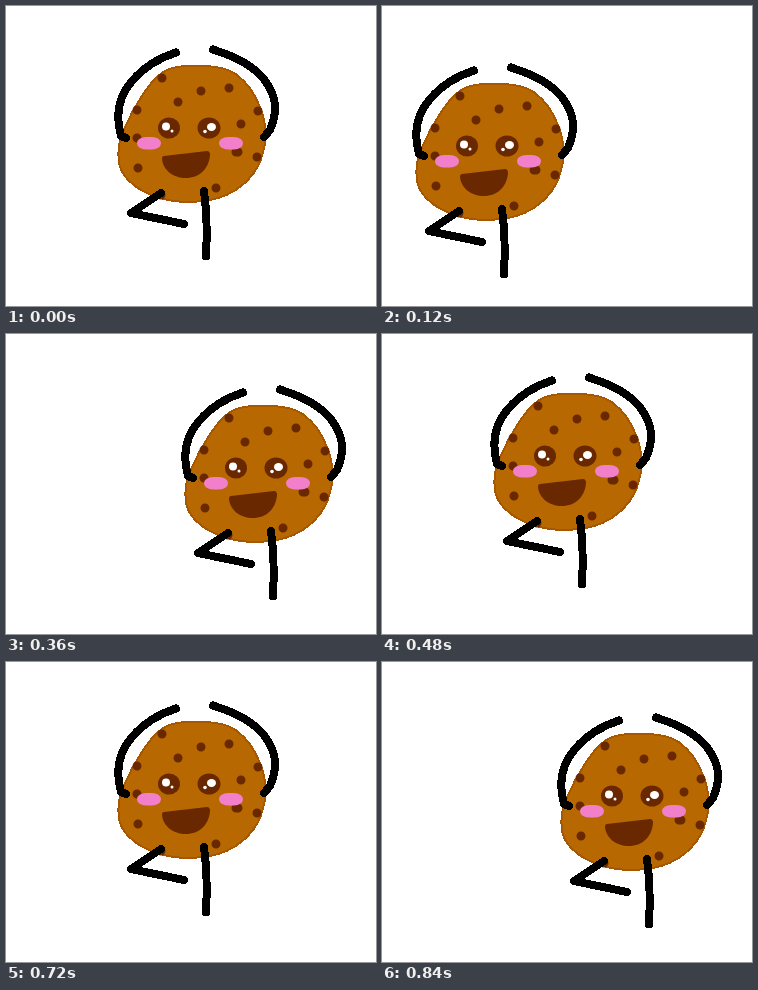
Recreate the animation shown at these times as an HTML page. Size 370 by 300 pixels, loop 0.96 s.

```html
<!DOCTYPE html>
<html lang="en">
<head>
<meta charset="utf-8">
<title>Dancing cookie</title>
<style>
  html, body { margin: 0; width: 100%; height: 100%; overflow: hidden; background: #fff; }
  svg { display: block; width: 370px; height: 300px; }
  .body { fill: #b86800; stroke: #a75700; stroke-width: 2; }
  .chips, .limbs { fill: none; stroke-linecap: round; stroke-linejoin: round; }
  .chips { stroke: #692800; stroke-width: 9; }
  .limbs { stroke: #000; stroke-width: 8; }
  .body, .limbs { shape-rendering: crispEdges; }
  .dark { fill: #692800; }
  .blush { fill: #f17fca; }
  .shine { fill: #fff; }
</style>
</head>
<body>
<svg viewBox="0 0 370 300">
  <g id="cookie">
    <path class="body" d="M156 67C165 60 178 60 190 60S219 60 231 69S249 88 254 101S262 130 257 146C253 166 236 185 212 192C200 196 189 196 178 196C162 195 148 192 135 184C122 176 115 168 113 157C111 143 113 133 119 121C126 105 143 75 156 67Z"/>
    <!-- Each chip is a zero-length stroke with round caps -->
    <path class="chips" d="M156 72h0M195 85h0M223 82h0M172 96h0M131 104h0M252 105h0M235 118h0M131 132h0M230 146h2M251 151h0M132 162h0M210 182h0M155 189h0"/>
    <g class="dark">
      <ellipse cx="163" cy="122" rx="11" ry="10.5"/>
      <ellipse cx="203" cy="122" rx="11.5" ry="10.5"/>
      <path d="M158 150L201 145Q204 145 204 149C203 163 193 172 180 172C167 172 157 164 156 153Q156 150 158 150Z"/>
    </g>
    <g class="shine">
      <circle cx="160" cy="120.5" r="4"/>
      <circle cx="166" cy="125" r="1.5"/>
      <ellipse cx="205.5" cy="121" rx="4.5" ry="4"/>
      <circle cx="199" cy="125.5" r="1.8"/>
    </g>
    <g class="blush">
      <rect x="131" y="131" width="24" height="12.5" rx="9"/>
      <rect x="213" y="131" width="24" height="12.5" rx="9"/>
    </g>
    <g class="limbs">
      <path d="M170 46.5C153 52 138 61 126 75C112 91 110 111 115 130L120 132"/>
      <path d="M207 43.5C230 51 249 60 260 76C272 94 271 107 264 124L258 131"/>
      <path d="M155 187L125 207L178 218"/>
      <path d="M198 185Q202 216 200 250.5"/>
    </g>
  </g>
</svg>
<script>
  const STEP = 120;
  const cookie = document.getElementById("cookie");

  // Hops centre, left, centre, right; the right hop is a little shorter and lower in height.
  function draw() {
    const beat = Math.floor(performance.now() / STEP);
    const side = -Math.round(Math.sin(beat * Math.PI / 2));
    const away = Math.abs(side);
    const x = 72.5 * side - 5.5 * away;
    const y = 15 * away - 3 * side;
    cookie.setAttribute("transform", `translate(${x} ${y})`);
    requestAnimationFrame(draw);
  }
  draw();
</script>
</body>
</html>
```
